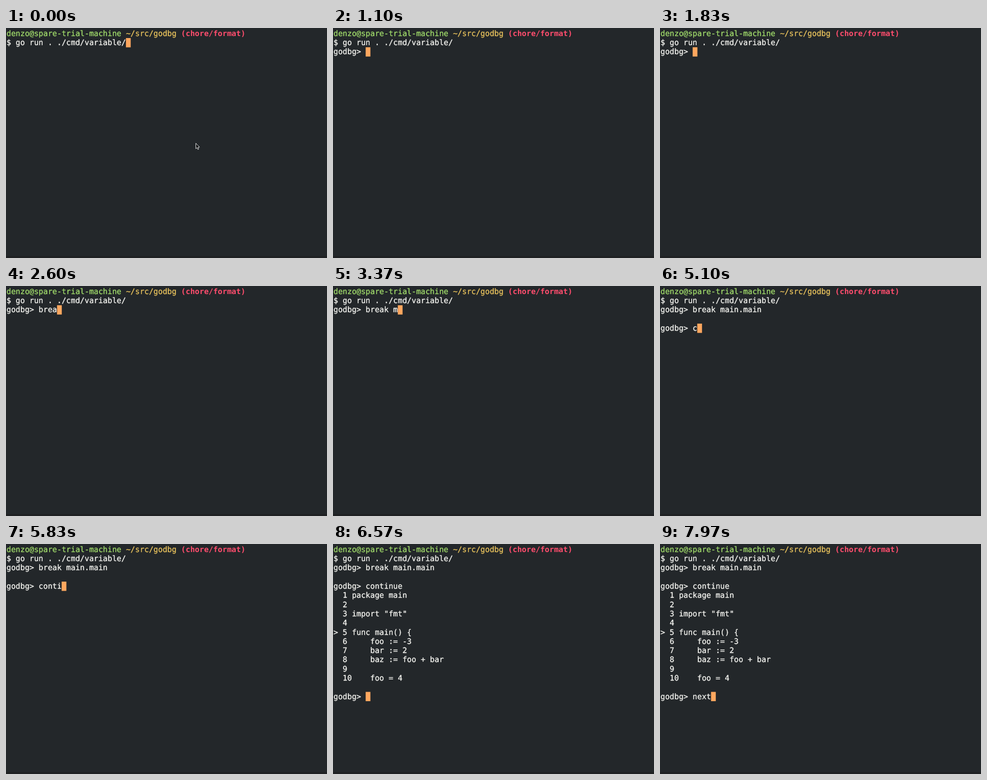
An HTML page with a canvas for the animation above (8000 ms loop, 640x458 px).

```html
<!DOCTYPE html>
<html lang="en">
<head>
<meta charset="utf-8">
<title>Debugger session</title>
<style>
html, body { margin: 0; width: 100%; height: 100%; overflow: hidden; background: #23272a; }
canvas { display: block; }
</style>
</head>
<body>
<canvas id="stage" width="640" height="458"></canvas>
<script>
const ctx = document.getElementById('stage').getContext('2d');
const LOOP = 8000;
const CELL = 9.16, LINE = 18.3, LEFT = 1, TOP = 1.7, BASE = 14.1;
const FONT = '15.2px "DejaVu Sans Mono", monospace';
const C = {
  bg: '#23272a', edge: '#1f2123', text: '#f2f2ee', green: '#9fd96a',
  yellow: '#e6c05c', red: '#ff4d6d', cursor: '#ffa75f'
};
const PROMPT = 'godbg> ';
const LISTING = [
  '  1 package main',
  '  2',
  '  3 import "fmt"',
  '  4',
  '> 5 func main() {',
  '  6     foo := -3',
  '  7     bar := 2',
  '  8     baz := foo + bar',
  '  9',
  '  10    foo = 4'
];

// Each input line: its row, when the prompt shows, and one time per key.
const INPUTS = [
  { row: 2, from: 770, text: 'break main.main',
    keys: [2130, 2300, 2430, 2570, 2730, 2930, 3300, 3470, 3570, 3700, 3870, 4000, 4100, 4170, 4270] },
  { row: 4, from: 4530, text: 'continue',
    keys: [4930, 5130, 5330, 5530, 5730, 5900, 6030, 6170] },
  { row: 16, from: 6400, text: 'next',
    keys: [7030, 7230, 7430, 7700] }
];
const RUN = '$ go run . ./cmd/variable/';
const RUN_ENTER = 430;

// Terminal grid: every character sits in its own cell.
// A hairline stroke gives the slightly heavier screen weight.
function print(row, col, text, color = C.text, bold = false) {
  ctx.font = (bold ? 'bold ' : '') + FONT;
  ctx.fillStyle = ctx.strokeStyle = color;
  ctx.lineWidth = 0.35;
  const y = TOP + row * LINE + BASE;
  [...text].forEach((ch, i) => {
    if (ch === ' ') return;
    const x = LEFT + (col + i) * CELL;
    ctx.fillText(ch, x, y);
    if (!bold) ctx.strokeText(ch, x, y);
  });
}

function drawHeader() {
  print(0, 0, 'denzo@spare-trial-machine', C.green);
  print(0, 26, '~/src/godbg', C.yellow);
  print(0, 38, '(chore/format)', C.red, true);
  print(1, 0, RUN);
}

function drawCursor(row, col) {
  ctx.fillStyle = C.cursor;
  ctx.fillRect(LEFT + col * CELL, TOP + row * LINE, CELL + 0.3, LINE + 0.2);
}

function drawPointer(x, y) {
  const points = [[0, 0], [0, 10.8], [2.4, 8.6], [4, 12.4], [5.8, 11.6], [4.3, 7.9], [7.4, 7.7]];
  ctx.beginPath();
  points.forEach(([dx, dy]) => ctx.lineTo(x + dx, y + dy));
  ctx.closePath();
  ctx.fillStyle = '#111315';
  ctx.fill();
  ctx.strokeStyle = '#e4e5e5';
  ctx.lineWidth = 1;
  ctx.stroke();
}

function draw(t) {
  ctx.fillStyle = C.bg;
  ctx.fillRect(0, 0, 640, 458);
  ctx.fillStyle = C.edge;
  ctx.fillRect(0, 454, 640, 4);
  drawHeader();

  let cursor = t < RUN_ENTER ? [1, RUN.length] : [2, 0];
  for (const { row, from, text, keys } of INPUTS) {
    if (t < from) break;
    const typed = keys.filter(k => k <= t).length;
    const line = PROMPT + text.slice(0, typed);
    print(row, 0, line);
    cursor = [row, line.length];
  }
  if (t >= INPUTS[2].from) LISTING.forEach((line, i) => print(5 + i, 0, line));

  drawCursor(...cursor);
  if (t < RUN_ENTER) drawPointer(378.5, 229.5);
}

ctx.textBaseline = 'alphabetic';
ctx.lineJoin = 'round';
if ('textRendering' in ctx) ctx.textRendering = 'geometricPrecision';
const start = performance.now();
function tick() {
  draw((performance.now() - start) % LOOP);
  requestAnimationFrame(tick);
}
tick();
</script>
</body>
</html>
```
